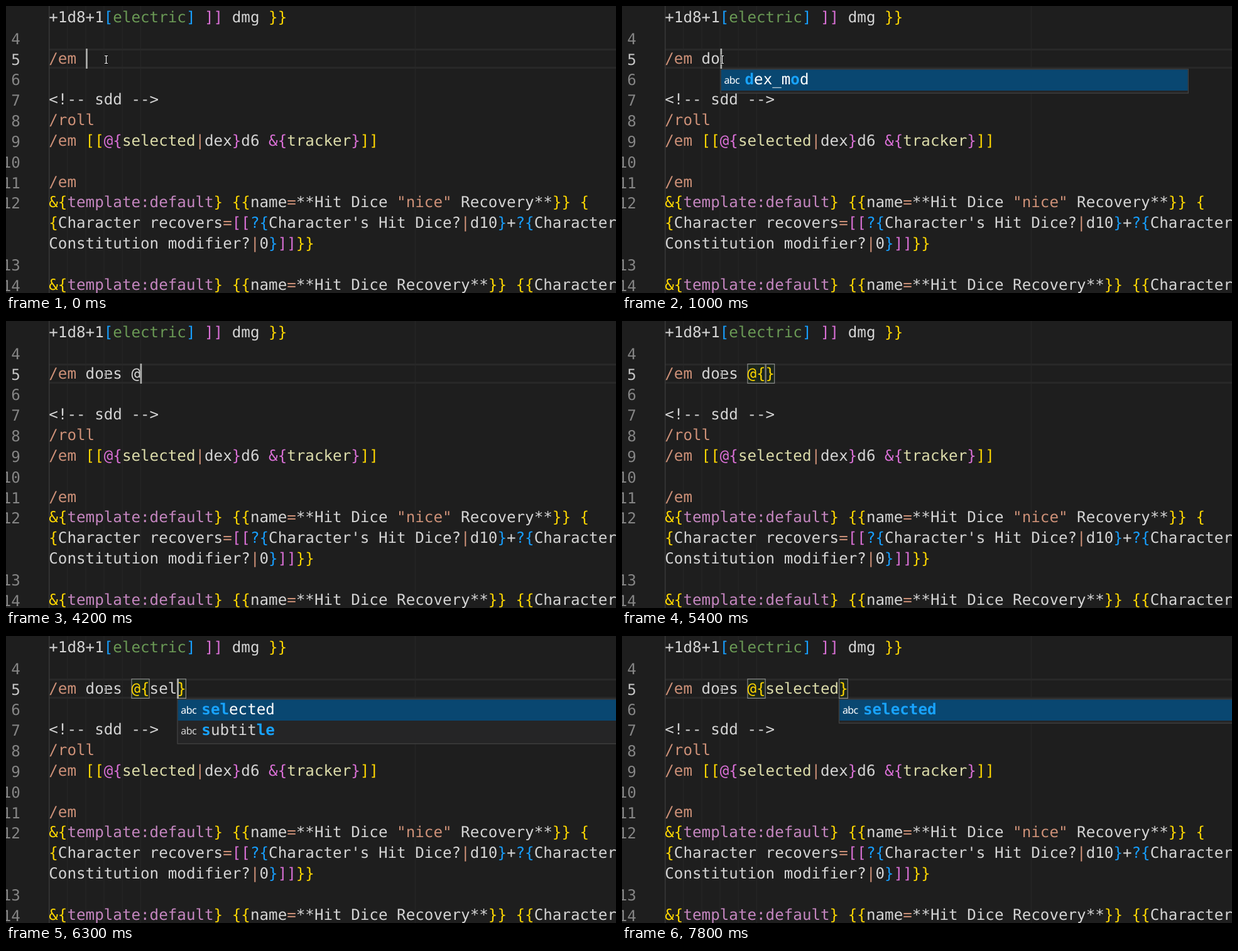
These frames come from a looping animation (971x458 px, 8000 ms). An HTML page with a canvas:

```html
<!DOCTYPE html>
<html lang="en">
<head>
<meta charset="utf-8">
<title>Editor autocomplete</title>
<style>
  html, body { margin: 0; width: 100%; height: 100%; overflow: hidden; background: #1e1e1e; }
  canvas { display: block; }
</style>
</head>
<body>
<canvas id="stage" width="971" height="458"></canvas>
<script>
const ctx = document.getElementById('stage').getContext('2d');
const LOOP = 8000, SCALE = 1.729, LEFT = 68.3, TOP = 2.2;
const ROW = 19 * SCALE, BASE = 23.6, NUMBER_BASE = 25.6;
const ADVANCE = 8.4287, CHAR = ADVANCE * SCALE;
const MONO = `${14 * SCALE}px "DejaVu Sans Mono", monospace`;
const COLORS = {
  w: '#d4d4d4', o: '#ce9178', y: '#ffd700', p: '#da70d6',
  b: '#179fff', g: '#6a9955', f: '#dcdcaa', k: '#c586c0'
};

// Each line: [row, number, segments]; a segment starts with its colour key.
const TEMPLATE = 'y&{¦ktemplate:default¦y} {{¦wname¦o=¦w**Hit Dice ';
const LINES = [
  [0, '', 'w+1d8+1¦b[¦gelectric¦b]¦p ]]¦w dmg ¦y}}'],
  [1, '4', ''],
  [3, '6', ''],
  [4, '7', 'w<!-- sdd -->'],
  [5, '8', 'o/roll'],
  [6, '9', 'o/em ¦y[[¦p@{¦fselected¦o|¦wdex¦p}¦wd6 ¦p&{¦ftracker¦p}¦y]]'],
  [7, '10', ''],
  [8, '11', 'o/em'],
  [9, '12', TEMPLATE + '¦o"nice"¦w Recovery**¦y}} {'],
  [10, '', "y{¦wCharacter recovers¦o=¦p[[¦b?{¦wCharacter's Hit Dice?¦o|¦wd10¦b}¦w+¦b?{¦wCharacter"],
  [11, '', 'wConstitution modifier?¦o|¦w0¦b}¦p]]¦y}}'],
  [12, '13', ''],
  [13, '14', TEMPLATE + 'Recovery**¦y}} {{¦wCharacter']
];

const D_WORDS = 'damage default dex dex_mod dex_save dmg DEX Damage Dice'.split(' ');
const S_WORDS = 'selected slashing stargate str str_mod str_save subtitle Save Short Stat STR'.split(' ');
const SE_WORDS = 'selected stargate str_save subtitle Save con_save dex_save int_save wis_save cha_save STR_SAVE'.split(' ');
const NONE = [];

// [start, typed text, caret visible, suggestions, caret column of the popup]
const STATES = [
  [0, '', 1],
  [200, '', 0],
  [600, 'd', 1, D_WORDS],
  [1000, 'do', 1, ['dex_mod']],
  [1200, 'doe', 1, NONE],
  [1700, 'does', 1, NONE, 7],
  [1800, 'does', 1],
  [2200, 'does ', 1],
  [2800, 'does ', 0],
  [3300, 'does ', 1],
  [3800, 'does ', 0],
  [4200, 'does @', 1],
  [4700, 'does @', 0],
  [4900, 'does @{', 1],
  [5400, 'does @{', 0],
  [5900, 'does @{s', 1],
  [6000, 'does @{s', 1, S_WORDS],
  [6100, 'does @{se', 1, SE_WORDS],
  [6300, 'does @{sel', 1, ['selected', 'subtitle']],
  [6400, 'does @{sele', 1, ['selected']],
  [6700, 'does @{selec', 1, ['selected']],
  [7000, 'does @{select', 1, ['selected']],
  [7100, 'does @{selecte', 1, ['selected']],
  [7300, 'does @{selected', 1, ['selected']],
  [7800, 'does @{selected', 0, ['selected']]
];
const BRACKETS_AT = 5000;

const rowTop = row => TOP + row * ROW;
const columnX = column => LEFT + column * CHAR;
const caretX = column => LEFT + Math.round(column * ADVANCE) * SCALE;

function rect(x, y, w, h, color) {
  ctx.fillStyle = color;
  ctx.fillRect(x, y, w, h);
}

function mono(text, x, baseline, color, weight = '') {
  ctx.font = `${weight} ${MONO}`;
  ctx.fillStyle = color;
  [...text].forEach((char, i) => ctx.fillText(char, x + i * CHAR, baseline));
}

function codeLine(row, number, segments) {
  const top = rowTop(row);
  mono(number, 22.8 - number.length * CHAR, top + NUMBER_BASE, row === 2 ? '#c6c6c6' : '#858585');
  let column = 0;
  for (const segment of segments.split('¦')) {
    const text = segment.slice(1);
    mono(text, columnX(column), top + BASE, COLORS[segment[0]]);
    column += text.length;
  }
}

function matchPositions(word, query) {
  const found = [];
  for (const char of query) {
    const at = word.toLowerCase().indexOf(char, found.length ? found[found.length - 1] + 1 : 0);
    if (at < 0) return null;
    found.push(at);
  }
  return found;
}

// Falls back to the query with its last two letters swapped.
function fuzzy(word, query) {
  const swapped = query.slice(0, -2) + [...query.slice(-2)].reverse().join('');
  return matchPositions(word, query) || matchPositions(word, swapped) || [];
}

function popup(x, items, query) {
  const y = 100.2, width = 745.5;
  const height = items.length ? items.length * ROW + 6.6 : 53.5;
  rect(x, y, width, height, '#454545');
  rect(x + 1.2, y + 1.2, width - 2.4, height - 2.4, '#252526');
  if (!items.length) {
    ctx.font = '22px "Noto Sans", sans-serif';
    ctx.fillStyle = COLORS.w;
    ctx.fillText('No suggestions.', x + 38, y + 34);
    return;
  }
  rect(x + 1.4, y + 1.4, width - 2.8, ROW + 0.6, '#094771');
  items.forEach((word, i) => {
    const baseline = y + 1.5 + i * ROW + BASE;
    const color = i ? COLORS.w : '#ffffff';
    ctx.font = '16px "Noto Sans", sans-serif';
    ctx.fillStyle = color;
    ctx.letterSpacing = '-0.6px';
    ctx.fillText('abc', x + 6, baseline - 1);
    ctx.letterSpacing = '0px';
    const hits = fuzzy(word, query);
    [...word].forEach((char, c) => {
      const hit = hits.includes(c);
      mono(char, x + 39 + c * CHAR, baseline, hit ? '#18a3ff' : color, hit ? 'bold' : '');
    });
  });
}

function bracketBox(column, length) {
  ctx.strokeStyle = '#888888';
  ctx.lineWidth = 1.2;
  ctx.fillStyle = 'rgba(0, 100, 0, 0.1)';
  ctx.beginPath();
  ctx.rect(columnX(column) + 0.5, 68.6, length * CHAR - 1, 30.8);
  ctx.fill();
  ctx.stroke();
}

function activeSegments(typed, bracketsOn) {
  const [before, inside] = typed.split('@{');
  if (inside === undefined) return `o/em ¦w${typed}`;
  const nameColor = inside === 'selected' ? 'f' : 'w';
  const brace = bracketsOn ? 'y' : 'w';
  return `o/em ¦w${before}¦${brace}@{¦${nameColor}${inside}¦${brace}}`;
}

function pointer() {
  for (const [width, color] of [[2.6, '#101010'], [1.2, '#ffffff']]) {
    ctx.strokeStyle = color;
    ctx.lineWidth = width;
    ctx.beginPath();
    ctx.moveTo(157, 79.5); ctx.lineTo(162, 79.5);
    ctx.moveTo(159.5, 79.5); ctx.lineTo(159.5, 91.5);
    ctx.moveTo(157, 91.5); ctx.lineTo(162, 91.5);
    ctx.stroke();
  }
}

function draw(time) {
  const [, typed, caretOn, items, anchor] = STATES.findLast(state => state[0] <= time);
  const column = 4 + typed.length;
  const bracketsOn = time >= BRACKETS_AT;

  rect(0, 0, 971, 458, '#1e1e1e');
  for (const ruler of [2, 4, 6, 8, 10, 40]) rect(columnX(ruler) - 0.5, 0, 1.5, 458, '#252525');
  rect(LEFT, 68, 971, 3, '#282828');
  rect(LEFT, 97, 971, 3, '#282828');
  rect(LEFT - 0.3, 0, 1.4, 458, '#3a3a3a');

  LINES.forEach(line => codeLine(...line));
  if (bracketsOn) {
    bracketBox(9, 2);
    bracketBox(column, 1);
  }
  codeLine(2, '5', activeSegments(typed, bracketsOn));
  if (caretOn) rect(caretX(column), 68, 2.7, 32, '#aeafad');
  if (items) popup(caretX(anchor || column), items, typed.split('{').pop());
  pointer();
}

ctx.textRendering = 'geometricPrecision';
function tick() {
  draw(performance.now() % LOOP);
  requestAnimationFrame(tick);
}
tick();
</script>
</body>
</html>
```
